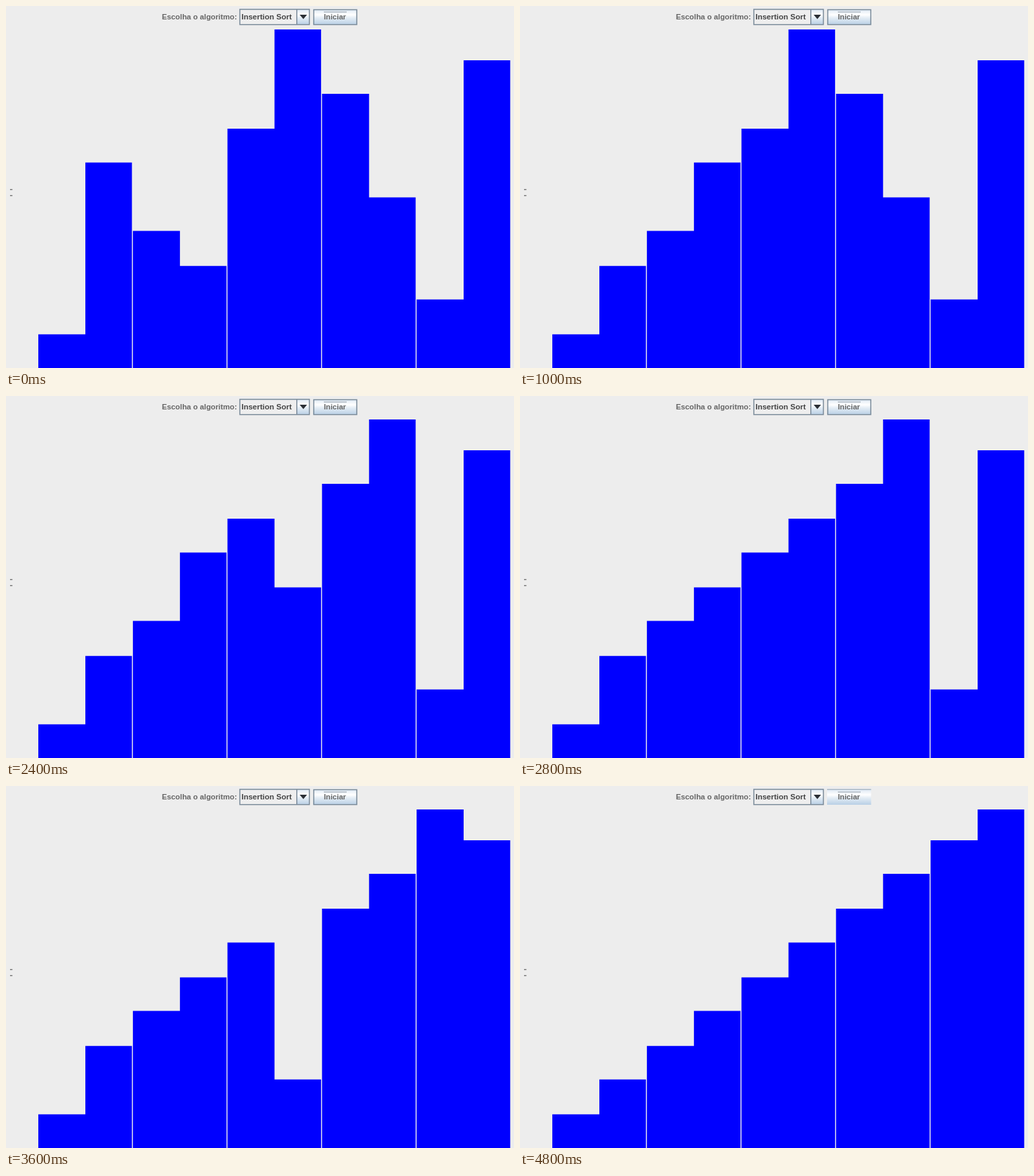
Recreate the animation shown at these times as an HTML page with a canvas. Size 756 px wide and 540 px high, loop 5200 ms.

```html
<!DOCTYPE html>
<html lang="pt">
<head>
<meta charset="utf-8">
<title>Insertion Sort</title>
<style>
html, body { margin: 0; width: 100%; height: 100%; overflow: hidden; background: #ededed; }
canvas { display: block; }
</style>
</head>
<body>
<canvas id="stage" width="756" height="540"></canvas>
<script>
const ctx = document.getElementById('stage').getContext('2d');
const W = 756, H = 540, LOOP = 5200, TICK = 200;
const START = [1, 6, 4, 3, 7, 10, 8, 5, 2, 9];
const TOPS = [489.7, 437.8, 387.8, 335.6, 285.5, 233.5, 183, 131, 81, 35];

// Every comparison of the insertion sort takes one tick.
function sortStates(values) {
  const a = values.slice(), states = [a.slice()];
  for (let i = 1; i < a.length; i++) {
    for (let j = i; j > 0; j--) {
      const swap = a[j - 1] > a[j];
      if (swap) [a[j - 1], a[j]] = [a[j], a[j - 1]];
      states.push(a.slice());
      if (!swap) break;
    }
  }
  return states;
}
const states = sortStates(START);

function rect(x, y, w, h, fill) {
  ctx.fillStyle = fill;
  ctx.fillRect(x, y, w, h);
}

function frame(x, y, w, h, color) {
  ctx.strokeStyle = color;
  ctx.lineWidth = 1.5;
  ctx.strokeRect(x, y, w, h);
}

function text(str, x, size, color) {
  ctx.font = `bold ${size}px "Liberation Sans", Arial, sans-serif`;
  ctx.fillStyle = color;
  ctx.fillText(str, x, 17);
}

function gloss(y, h) {
  const g = ctx.createLinearGradient(0, y, 0, y + h);
  g.addColorStop(0, '#dde8f3');
  g.addColorStop(0.35, '#ffffff');
  g.addColorStop(0.55, '#e4edf5');
  g.addColorStop(1, '#b8cfe5');
  return g;
}

function drawToolbar(done) {
  ctx.textBaseline = 'middle';
  text('Escolha o algoritmo:', 232, 11.3, '#666');

  rect(348, 5, 103, 23, '#eeeeee');
  rect(433, 5, 18, 23, gloss(5, 23));
  frame(348, 5, 103.5, 22.7, '#7a8a99');
  rect(432, 5, 1.5, 23, '#7a8a99');
  text('Insertion Sort', 350.5, 11.5, '#444');
  ctx.fillStyle = '#2b2f36';
  ctx.beginPath();
  ctx.moveTo(437, 13);
  ctx.lineTo(448, 13);
  ctx.lineTo(442.5, 19.5);
  ctx.fill();

  rect(457, 5, 65.5, 23, gloss(5, 23));
  if (done) rect(457, 4.5, 65.5, 1.5, '#a9b8c6');
  else frame(458, 5.5, 64, 22.2, '#7a8a99');
  rect(473, 8.5, 34, 1, '#8d99a5');
  text('Iniciar', 473, 11.2, '#666');
}

// Bars stand in touching pairs; each pair is one outline, so no seam shows.
function drawBars(values) {
  ctx.fillStyle = '#0000ff';
  for (let i = 0; i < values.length; i += 2) {
    const left = 48.1 + 70.37 * i, mid = left + 70, right = left + 139.3;
    const y1 = TOPS[values[i] - 1], y2 = TOPS[values[i + 1] - 1];
    ctx.beginPath();
    ctx.moveTo(left, H);
    ctx.lineTo(left, y1);
    ctx.lineTo(mid, y1);
    ctx.lineTo(mid, y2);
    ctx.lineTo(right, y2);
    ctx.lineTo(right, H);
    ctx.fill();
  }
}

function draw(now) {
  const step = Math.floor((now % LOOP) / TICK);
  const values = states[Math.min(step, states.length - 1)];
  rect(0, 0, W, H, '#ededed');
  rect(6, 273, 3.5, 1.5, '#777');
  rect(6, 282, 3.5, 1.5, '#777');
  drawToolbar(values.every((v, i) => v === i + 1));
  drawBars(values);
}

let begin;
function loop(now) {
  begin ??= now;
  draw(Math.max(0, now - begin));
  requestAnimationFrame(loop);
}
draw(0);
requestAnimationFrame(loop);
</script>
</body>
</html>
```
